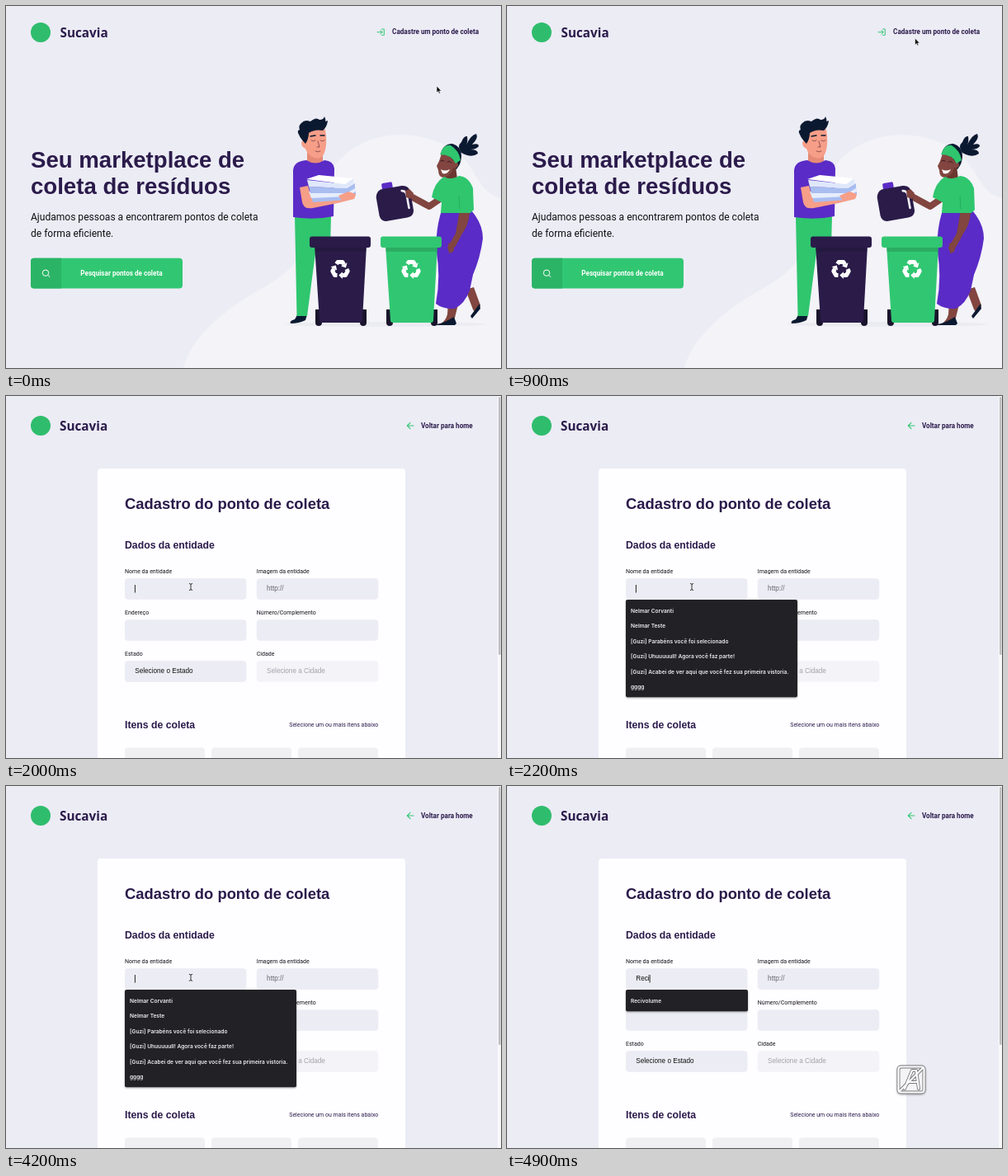
Animation, 600 px wide and 439 px high, one loop 5 s. Source, as an HTML page:

```html
<!DOCTYPE html>
<html lang="pt-BR">
<head>
<meta charset="utf-8">
<title>Pontos de coleta</title>
<style>
html, body { margin: 0; width: 100%; height: 100%; overflow: hidden; background: #ececf5; }
svg { display: block; width: 600px; height: 439px; }
text { white-space: pre; }
.brand { font: 600 15.3px "Noto Sans", sans-serif; fill: #2b1b4b; }
.title { font: 700 27.6px "Liberation Sans", Arial, sans-serif; fill: #2b1b4b; }
.head { font: 700 18.4px "Liberation Sans", Arial, sans-serif; fill: #2b1b4b; }
.sub { font: 700 12.26px "Liberation Sans", Arial, sans-serif; fill: #2b1b4b; }
.lead { font: 400 12.05px Roboto, sans-serif; fill: #111014; }
.label { font: 400 7.02px Roboto, sans-serif; fill: #15131a; }
.link { font: 700 8.15px Roboto, sans-serif; fill: #2b1b4b; }
.field { font: 400 8.17px "Liberation Sans", Arial, sans-serif; fill: #111; }
.option { font: 600 6.6px Inter, sans-serif; fill: #eeedf0; }
.line { fill: none; stroke-linecap: round; stroke-linejoin: round; }
</style>
</head>
<body>
<svg viewBox="0 0 600 439">
<defs>
  <filter id="soft" x="-20%" y="-20%" width="140%" height="140%">
    <feDropShadow dx="0" dy="1" stdDeviation="1.2" flood-color="#000" flood-opacity=".35"/>
  </filter>
  <g id="chaser">
    <path d="M-4.4-6.6L-2.8-9H2.8L4.6-6" fill="none" stroke="#fff" stroke-width="5" stroke-linejoin="round"/>
    <path d="M8.6-8.3L1-3.9 6.9-2Z" fill="#fff"/>
  </g>
  <g id="recycle">
    <use href="#chaser"/>
    <use href="#chaser" transform="rotate(120)"/>
    <use href="#chaser" transform="rotate(240)"/>
  </g>
  <g id="bin">
    <path d="M7 368h8v16q0 4-4 4t-4-4ZM62 368h7v16q0 4-4 4t-4-4Z" fill="#19142b"/>
    <path d="M6 290H69L64 381Q64 384 61 384H15Q12 384 12 381Z"/>
    <path d="M6 293H69L68.7 298H6.3Z" fill="#000" opacity=".13"/>
    <rect y="279.5" width="74" height="13.5" rx="3"/>
    <use href="#recycle" x="37" y="319.5"/>
  </g>
</defs>

<rect width="600" height="439" fill="#ececf5"/>

<g id="home">
  <path d="M215 439C222 408 254 377 294 352C332 330 355 318 362 283C369 241 381 207 410 181C442 153 488 150 526 166C564 181 567 211 585 226Q591 231 600 233V439Z" fill="#f3f3f8"/>
  <circle cx="42" cy="32" r="12" fill="#2fbd6d"/>
  <text class="brand" x="65.5" y="38">Sucavia</text>
  <path class="line" d="M455.5 28H458.3V35.3H455.5M450 31.7H456M453.8 29.3L456.2 31.7 453.8 34.1" stroke="#33c873" stroke-width="1"/>
  <text class="link" x="573" y="34.3" text-anchor="end">Cadastre um ponto de coleta</text>

  <text class="title" x="30" y="196">Seu marketplace de</text>
  <text class="title" x="30" y="227.6">coleta de resíduos</text>
  <text class="lead" x="30" y="260.3">Ajudamos pessoas a encontrarem pontos de coleta</text>
  <text class="lead" x="30" y="279.5">de forma eficiente.</text>
  <rect x="30" y="305.7" width="184" height="36.8" rx="4" fill="#31c772"/>
  <path d="M34 305.7H67V342.5H34Q30 342.5 30 338.5V309.7Q30 305.7 34 305.7Z" fill="#2bb466"/>
  <path class="line" d="M51.2 326.8L53 328.5" stroke="#fff" stroke-width="1"/>
  <circle cx="48" cy="323.7" r="3.7" fill="none" stroke="#fff"/>
  <text class="link" x="90.3" y="327.2" style="fill:#fff">Pesquisar pontos de coleta</text>

  <ellipse cx="460" cy="386" rx="122" ry="3" fill="#ebebf2"/>

  <g id="man">
    <path d="M354 373L365 374 363 381Q355 385 345 385Q343 382 350 380Z" fill="#0b1930"/>
    <path d="M350 254H394L393 293H376L371 330 365 376H352.5Z" fill="#2fc66e"/>
    <path d="M365 172H384V190Q375 196 365 190Z" fill="#e58a76"/>
    <path d="M362 150Q374 144 387 150Q390 166 386 178Q382 187 374 184Q366 182 363 173Q358 171 358 166Q359 162 362 164Z" fill="#f69e88"/>
    <path d="M363 167Q357 161 355 156Q352 151 356 150Q354 145 358 142Q362 137 369 140Q376 134 380 138Q385 138 386 134Q388 138 387 140L390 139Q389 147 384 151Q374 149 367 154Q367 161 363 167Z" fill="#0b1930"/>
    <path class="line" d="M370 163Q373 165 375 163M381 163Q384 165 386 163M378 164L380 171H377M375 176Q378 178 381 176" stroke="#6b303a" stroke-width=".7"/>
    <path class="line" d="M369 158L375 157M381 157L386 157" stroke="#0b1930" stroke-width="1.3"/>
    <path d="M364 187Q375 194 386 187Q397 188 398 197L397 255Q374 260 348 256L348 199Q349 188 364 187Z" fill="#5a2bc6"/>
    <path d="M356 220L366 218 370 232 405 229 415 225 424 229 422 234 402 239 372 245Q361 247 359 238Z" fill="#f69e88"/>
    <g id="papers">
      <path d="M370 231L415 230 424 224 424 229 413 235 372 238Z" fill="#a9bdf0"/>
      <path d="M367 225L414 227 424 220 424 225 413 231 370 233Z" fill="#e6edfc"/>
      <path d="M367 219L413 221 423 215 423 221 413 227 369 227Z" fill="#a9bdf0"/>
      <path d="M365 211L411 216 421 209 421 215 412 221 367 219Z" fill="#dfe8fb"/>
      <path d="M364 210L379 205 421 209 411 216Z" fill="#fff"/>
    </g>
    <path d="M403 230L415 225 424 228 421 234 407 236Z" fill="#f69e88"/>
  </g>

  <g id="woman">
    <path d="M536 358H549L544 378 536 386H526Q533 382 535 374ZM557 344L567 341 575 363 570 373 566 368Z" fill="#82453f"/>
    <path d="M522 386Q532 384 543 377L546 385 544 387H522ZM574 361L575 367 565 379 563 376Z" fill="#0b1930"/>
    <path d="M528 248H564Q578 264 578 282Q575 305 566 326L562 345Q556 361 544 367Q530 368 521 361Q527 329 522 300Q520 272 528 248Z" fill="#5a2bc6"/>
    <path d="M552 178Q546 170 552 165Q555 157 559 158Q560 164 558 168Q564 156 570 155Q573 160 565 168Q573 166 573 170Q570 174 563 174Q572 174 572 179Q565 184 556 180Z" fill="#0b1930"/>
    <path d="M527 179Q530 167 541 167Q552 170 552 182Q552 191 546 198L533 194Z" fill="#0b1930"/>
    <path d="M531 199L545 194 547 210Q538 216 531 209Z" fill="#6b362f"/>
    <path d="M528 179Q537 179 543 188Q549 188 548 194Q545 198 542 196Q540 206 531 208Q524 208 524 199L522 194 525 188Z" fill="#82453f"/>
    <path d="M530 172Q534 168 539 169Q549 175 551 187L545 191Q540 180 526 180Z" fill="#2fc66e"/>
    <path class="line" d="M527 188Q529 186 531 188M535 189Q538 187 540 190" stroke="#2a1420" stroke-width=".9"/>
    <path d="M527 198Q532 201 538 198Q535 205 529 203Z" fill="#fff"/>
    <path class="line" d="M489 230L513 243 526 234" stroke="#82453f" stroke-width="8"/>
    <path d="M550 247H562Q562 264 553 276L545 291 537 298 535 293 545 276Z" fill="#82453f"/>
    <path d="M531 207Q540 212 549 206Q561 207 566 221L567 247 563 251H527L528 238 516 232Q519 214 531 207Z" fill="#2fc66e"/>
    <path class="line" d="M549 231L550 246" stroke="#24ad5d" stroke-width="1"/>
  </g>

  <g id="jug" transform="rotate(-10 470 238)">
    <rect x="459" y="213" width="13" height="8" rx="2" fill="#5a2bc6"/>
    <path d="M457 220H483Q492 221 492 230V250Q492 259 483 259H457Q450 258 450 250V229Q451 222 457 220Z" fill="#2a1b49"/>
    <path class="line" d="M482 226Q487 227 487 232V248" stroke="#f3f3f8" stroke-width="2.6"/>
  </g>
  <path d="M484 224L489 222 494 227 491 234 485 232Z" fill="#82453f"/>
  <use href="#bin" x="368" fill="#2a1b49"/>
  <use href="#bin" x="454" fill="#31c772"/>
  <path d="M536 288L545 286 542 298 537 300Z" fill="#82453f"/>
</g>

<g id="form">
  <circle cx="42" cy="36" r="12" fill="#2fbd6d"/>
  <text class="brand" x="65" y="42">Sucavia</text>
  <path id="backArrow" class="line" d="M494 36H486.5M490 32.3L486.3 36 490 39.7" stroke="#33c873" stroke-width="1.1"/>
  <text class="link" x="565.7" y="38.8" text-anchor="end">Voltar para home</text>
  <rect x="111" y="88" width="373" height="360" rx="4" fill="#fefdff"/>
  <text class="head" x="144" y="137.3">Cadastro do ponto de coleta</text>
  <text class="sub" x="144" y="185.3">Dados da entidade</text>
  <g id="fields"></g>
  <text class="sub" x="144" y="402.7">Itens de coleta</text>
  <text class="label" x="451.3" y="401.3" text-anchor="end" style="fill:#2b1b4b">Selecione um ou mais itens abaixo</text>
  <g fill="#f0eff1">
    <rect x="144" y="426.5" width="97" height="30" rx="4"/>
    <rect x="249" y="426.5" width="97" height="30" rx="4"/>
    <rect x="354" y="426.5" width="97" height="30" rx="4"/>
  </g>
  <rect x="596" width="4" height="439" fill="#f8f8fa"/>
  <rect x="597" y="1" width="2.6" height="313" rx="1.3" fill="#bfbfc2"/>
  <text id="typed" class="field" x="156.3" y="236.4"></text>
  <rect id="caret" y="229" width=".9" height="9.5" fill="#111"/>
  <g id="menu">
    <rect id="menuBox" x="144" y="247" rx="2" fill="#242126" filter="url(#soft)"/>
    <g id="options"></g>
  </g>
  <g id="capsHint" class="line" filter="url(#soft)">
    <g id="capsShape">
      <rect x="474.5" y="340.5" width="31" height="31" rx="3"/>
      <path d="M482 367L491 345H496L499 367M486 359H498"/>
      <path class="slash" d="M475.5 370.5L504.5 341.5"/>
    </g>
  </g>
</g>

<path id="arrow" d="M0 0V8.2L1.9 6.5 3.1 9.2 4.5 8.6 3.3 6H5.8Z" fill="#111" stroke="#fff" stroke-width=".6"/>
<path id="beam" class="line" d="M-1.7-4Q0-4 0-3V3Q0 4-1.7 4M1.7-4Q0-4 0-3M0 3Q0 4 1.7 4" stroke="#222" stroke-width=".9"/>
</svg>

<script>
const LOOP = 5000, STEP = 100;
const $ = id => document.getElementById(id);
const show = (id, on) => { $(id).style.display = on ? "" : "none"; };

const labels = ["Nome da entidade", "Imagem da entidade", "Endereço", "Número/Complemento", "Estado", "Cidade"];
const hints = ["", "http://", "", "", "Selecione o Estado", "Selecione a Cidade"];
const hintColors = ["", "#666670", "", "", "#111", "#a2a2a9"];
$("fields").innerHTML = labels.map((label, i) => {
  const x = 144 + (i % 2) * 159.8, y = 221.3 + Math.floor(i / 2) * 50;
  return `<text class="label" x="${x}" y="${y - 6}">${label}</text>
    <rect x="${x}" y="${y}" width="147.4" height="25.4" rx="4" fill="${i === 5 ? "#f3f3f8" : "#ececf4"}"/>
    <text class="field" x="${x + 12.3}" y="${y + 15.1}" style="fill:${hintColors[i]}">${hints[i]}</text>`;
}).join("");

const history = ["Nelmar Corvanti", "Nelmar Teste", "[Guzi] Parabéns você foi selecionado",
  "[Guzi] Uhuuuuull! Agora você faz parte!",
  "[Guzi] Acabei de ver aqui que você fez sua primeira vistoria.", "gggg"];
const matches = ["Recivolume"];

function setMenu(items, width, height) {
  $("menuBox").setAttribute("width", width);
  $("menuBox").setAttribute("height", height);
  $("options").innerHTML = items.map((item, i) =>
    `<text class="option" x="150" y="${262.9 + i * 18.4}">${item}</text>`).join("");
}

// Dark halo below, white strokes above
const capsLines = $("capsShape").innerHTML;
$("capsShape").innerHTML = `<rect x="474" y="340" width="32" height="32" rx="4" fill="#f4f4f6"/>
  <g stroke="#77777b" stroke-width="4">${capsLines}</g>
  <g stroke="#fff" stroke-width="2.2">${capsLines}</g>`;

// Pointer: time, x, y
const pointer = [[0, 522, 97], [300, 507, 62], [600, 494.5, 41], [900, 494.5, 39], [1000, 406.5, 83.5],
  [1200, 376, 104], [1400, 288, 182], [1600, 228, 250], [1700, 224, 254], [1900, 224, 231.5],
  [2400, 224, 231.5], [2500, 224, 232.3]];

function pointerAt(t) {
  const i = pointer.findIndex(p => p[0] > t);
  if (i < 0) return pointer[pointer.length - 1].slice(1);
  const [t0, x0, y0] = pointer[i - 1], [t1, x1, y1] = pointer[i];
  const k = (t - t0) / (t1 - t0);
  return [x0 + (x1 - x0) * k, y0 + (y1 - y0) * k];
}

function caretOpacity(t) {
  if (t < 1900) return 0;
  if (t >= 4400 || t < 2500) return 1;
  const phase = (t - 2500) % 1000;
  if (phase === 0 || phase === 600) return 0.5;
  return phase > 600 ? 1 : 0;
}

function draw(t) {
  const onForm = t >= 1000;
  show("home", !onForm);
  show("form", onForm);
  show("backArrow", t >= 1100);

  const [x, y] = pointerAt(t);
  const overField = onForm && x > 144 && x < 291 && y > 221 && y < 247;
  const typing = t >= 4500;
  show("arrow", !overField);
  show("beam", overField && !typing);
  $(overField ? "beam" : "arrow").setAttribute("transform", `translate(${x} ${y})`);
  if (!onForm) return;

  const length = t < 4500 ? 0 : t < 4700 ? 1 : (t - 4700) / STEP + 2;
  $("typed").textContent = matches[0].slice(0, length);
  const typedWidth = length ? $("typed").getComputedTextLength() : -0.4;
  $("caret").setAttribute("x", 156.3 + typedWidth);
  $("caret").setAttribute("opacity", caretOpacity(t));

  show("menu", t >= 2100);
  if (typing) setMenu(matches, 148, 26.3);
  else setMenu(history, 208, 118.3);

  show("capsHint", t >= 4400);
  document.querySelectorAll(".slash").forEach(s => { s.style.display = t >= 4600 ? "" : "none"; });
}

const start = performance.now();
let last = -1;
function tick() {
  const elapsed = (performance.now() - start) % LOOP;
  const t = Math.floor(elapsed / STEP) * STEP;
  if (t !== last) draw(last = t);
  requestAnimationFrame(tick);
}
tick();
</script>
</body>
</html>
```
